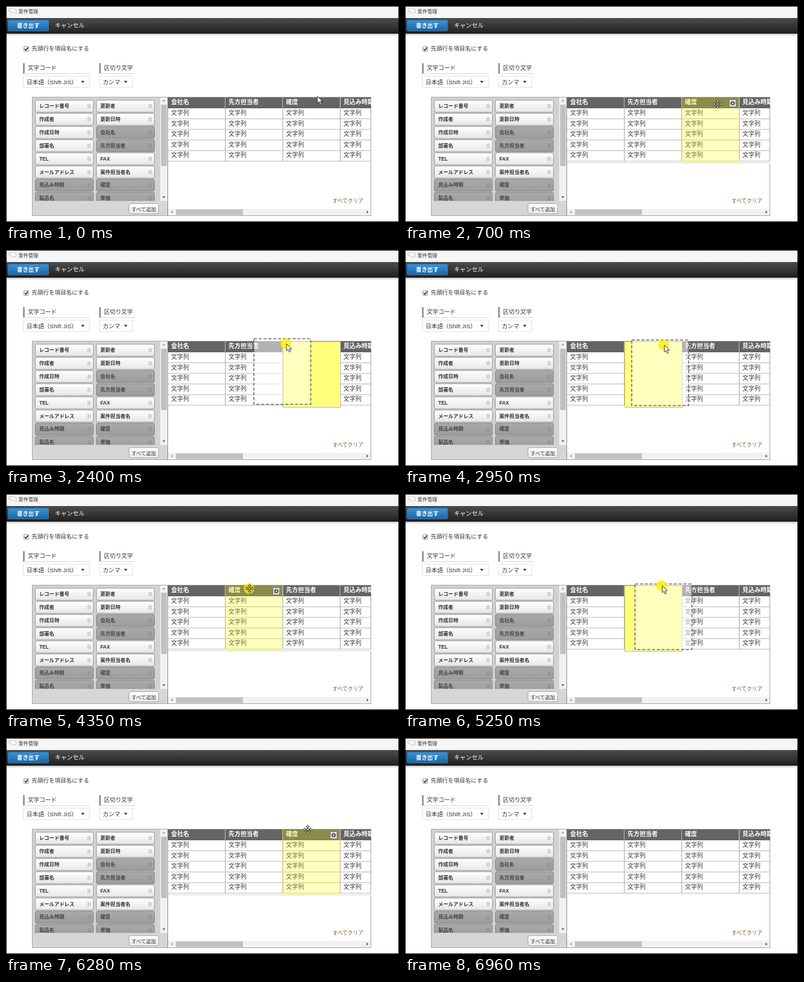
Recreate the animation shown at these times as an HTML page. Size 650 px wide and 359 px high, loop 7.03 s.

```html
<!DOCTYPE html>
<html lang="ja">
<head>
<meta charset="utf-8">
<title>案件管理</title>
<style>
html, body { margin: 0; width: 100%; height: 100%; overflow: hidden; background: #fff; }
svg { display: block; width: 650px; height: 359px; }
text { font-family: "Liberation Sans", "Noto Sans CJK JP", "Noto Sans CJK", sans-serif; white-space: pre; }
</style>
</head>
<body>
<svg id="stage" viewBox="0 0 650 359">
  <defs>
    <linearGradient id="bar" x2="0" y2="1"><stop stop-color="#4c4c4c"/><stop offset="1" stop-color="#1f1f1f"/></linearGradient>
    <linearGradient id="blue" x2="0" y2="1"><stop stop-color="#3d92d0"/><stop offset="1" stop-color="#1667ae"/></linearGradient>
    <linearGradient id="free" x2="0" y2="1"><stop stop-color="#fff"/><stop offset="1" stop-color="#e6e6e6"/></linearGradient>
    <linearGradient id="used" x2="0" y2="1"><stop stop-color="#a9a9a9"/><stop offset="1" stop-color="#9c9c9c"/></linearGradient>
    <linearGradient id="shade" x2="0" y2="1"><stop stop-color="#c4c4c4"/><stop offset="1" stop-color="#fff"/></linearGradient>
    <clipPath id="listClip"><rect x="43" y="152" width="212" height="172"/></clipPath>
    <clipPath id="tableClip"><rect x="268" y="140" width="336" height="197"/></clipPath>
  </defs>
  <g id="page"></g>
  <g id="table" clip-path="url(#tableClip)"></g>
  <g id="pointer"></g>
</svg>
<script>
const $ = id => document.getElementById(id);
const rect = (x, y, w, h, fill, more = '') =>
  `<rect x="${x}" y="${y}" width="${w}" height="${h}" fill="${fill}" ${more}/>`;
const text = (x, y, s, size, fill = '#333', more = '') =>
  `<text x="${x}" y="${y}" font-size="${size}" fill="${fill}" ${more}>${s}</text>`;
const path = (d, fill, more = '') => `<path d="${d}" fill="${fill}" ${more}/>`;
const bold = 'font-weight="bold"';

function item(name, n) {
  const x = 48 + n % 2 * 101, y = 156 + (n >> 1) * 21.9;
  const used = [5, 7, 12, 13, 14, 15].includes(n);
  return rect(x + .5, y + .5, 96, 20, used ? 'url(#used)' : 'url(#free)', `rx="2.5" stroke="${used ? '#868686' : '#999'}"`) +
    text(x + 7, y + 13, name, 8.3, used ? '#444' : '#333', bold) +
    path(`M${x + 87.5} ${y + 7}v7m2 -7v7m2 -7v7`, 'none', `stroke="${used ? '#888' : '#aaa'}" stroke-width=".8"`);
}

function select(x, w, label, value) {
  return rect(x, 95, 3, 17, '#999') + text(x + 8, 106, label, 9.6) +
    rect(x, 112, w + (w < 60 ? 3 : 0), 1, '#d5d5d5') +
    rect(x + .5, 116.5, w - 1, 19, '#fff', 'stroke="#e2e2e2"') +
    text(x + 6, 129.5, value, 9.6) +
    path(`M${x + w - 15} 124.5h6l-3 3.5z`, '#333');
}

const items = ['レコード番号', '更新者', '作成者', '更新日時', '作成日時', '会社名', '部署名', '先方担当者',
  'TEL', 'FAX', 'メールアドレス', '案件担当者名', '見込み時期', '確度', '製品名', '単価'];

$('page').innerHTML =
  rect(0, 0, 650, 359, '#fff') + rect(0, 0, 650, 20, '#f6f6f6') +
  path('M5 5h3l1.500 -1.500h3l1 2h3.500v5.500h-9v-2.500h-3z', '#fffaf0', 'stroke="#c9b9a0" stroke-width=".8"') +
  text(20.5, 12, '案件管理', 8.2) +
  rect(0, 20, 650, 26, 'url(#bar)') + rect(0, 46, 650, 4, 'url(#shade)') +
  rect(3.5, 23.5, 67, 18, 'url(#blue)', 'rx="2" stroke="#2d75b0"') +
  text(18, 36, '書き出す', 9.4, '#fff', bold) + text(81, 36, 'キャンセル', 9.8, '#fff') +
  rect(29.5, 67.5, 8, 8, '#f4f4f4', 'rx="1" stroke="#999"') +
  path('M31 71.500l2 2.200l3.500 -5', 'none', 'stroke="#333" stroke-width="1.700"') +
  text(42.5, 74, '先頭行を項目名にする', 9.5) +
  select(28, 111, '文字コード', '日本語（Shift JIS）') + select(154, 56, '区切り文字', 'カンマ') +
  // field list
  rect(43, 151, 225, 198, '#d2d2d5') +
  `<g clip-path="url(#listClip)">${items.map(item).join('')}</g>` +
  rect(255, 152, 12, 172, '#f1f1f1') + rect(256.5, 164, 9.5, 102, '#c1c1c1') +
  path('M258.500 158.500h5l-2.500 -3z', '#999') + path('M258.500 316.500h5l-2.500 3z', '#555') +
  rect(43, 324, 224, 25, '#d6d6d9') + rect(43.5, 151.5, 560, 197, 'none', 'stroke="#a6a6a6"') +
  rect(203.5, 328.5, 49, 17, 'url(#free)', 'rx="2.500" stroke="#aaa"') +
  text(207.5, 340.5, 'すべて追加', 8.3) +
  // table pane
  rect(268, 152, 335, 196, '#fff') + rect(267, 152, 1, 196, '#8a8a8a') +
  rect(268, 337, 335, 11, '#f1f1f1') + rect(281, 338, 111, 9.5, '#c1c1c1') +
  path('M275.500 340v5l-3 -2.500z', '#999') + path('M596.500 340v5l3 -2.500z', '#555') +
  text(540, 326.5, 'すべてクリア', 8.7, '#85522d') +
  rect(.5, .5, 649, 358, 'none', 'stroke="#111"');

const colX = [268, 363, 458, 553];
function column(name, slot) {
  const x = colX[slot];
  let s = rect(x, 152, 95, 18, '#646464') + text(x + 5, 163, name, 10, '#fff', bold);
  for (let r = 0; r < 5; r++) {
    s += rect(x, 187 + r * 17.6, 95, 1, '#b5b5b5') + text(x + 5, 181 + r * 17.6, '文字列', 10);
  }
  return s + rect(x + 94, 152, 1.5, 106, '#bdbdbd');
}

const gear = x => rect(x + 78.5, 155.5, 11, 12, '#eee', 'rx="1.500" stroke="#777"') +
  `<g fill="none" stroke="#444"><circle cx="${x + 84}" cy="161.500" r="2.200" stroke-width="1.600"/>` +
  `<circle cx="${x + 84}" cy="161.500" r="3.500" stroke-width="1.200" stroke-dasharray="1.370"/></g>`;

const arrow = 'M0 0v11.500l2.700 -2.400l2 4.500l2 -.9l-2 -4.300h3.700z';
const moveIcon = 'M0 -7.500l2.500 3h-1.700v3.700h3.700v-1.700l3 2.500l-3 2.500v-1.700h-3.700v3.700h1.700l-2.500 3l-2.500 -3h1.700v-3.700h-3.700v1.700l-3 -2.500l3 -2.500v1.700h3.700v-3.700h-1.700z';

// pointer track: step, x, y
const track = [[0, 515, 150], [2, 515, 150], [3, 515, 154], [5, 515, 155], [9, 517, 163], [24, 517, 163],
  [25, 512, 161], [31, 464, 156], [34, 447, 156], [38, 429, 158], [41, 424, 161], [54, 424, 161],
  [56, 403, 157], [65, 403, 157], [66, 405, 155], [70, 446, 150], [74, 490, 153], [77, 499, 152],
  [87, 499, 152], [88, 480, 217], [89, 460, 345], [90, 460, 345]];
function pointerAt(i) {
  const k = Math.max(1, track.findIndex(p => p[0] >= i));
  const [a, ax, ay] = track[k - 1], [b, bx, by] = track[k], u = (i - a) / (b - a);
  return [ax + (bx - ax) * u, ay + (by - ay) * u];
}

const between = (i, a, b) => i >= a && i < b;

function draw(i) {
  const [x, y] = pointerAt(i);
  const drag = between(i, 25, 45) || between(i, 66, 81);
  const press = between(i, 17, 45) || between(i, 56, 81);
  const hover = !drag && between(i, 3, 88);
  const slot = x < 458 ? 1 : 2, left = colX[slot];

  let s = column('会社名', 0) + column('先方担当者', 3 - slot) + column('見込み時期', 3);
  if (drag) {
    const [dx, dy] = i < 45 ? [54, 9] : [45, 3.5];
    s += rect(left + .5, 152.5, 95, 109, '#ffff7d', 'stroke="#777" stroke-dasharray="1"') +
      rect(x - dx, y - dy + .5, 94, 109, 'rgba(255,255,255,.5)', 'stroke="#6b6b5e" stroke-width="1.600" stroke-dasharray="5 3"');
  } else {
    s += column('確度', slot);
    if (hover) s += rect(268, 258, 336, 4, '#eee') + rect(left, 152, 95, 110, 'rgba(255,255,0,.25)') + gear(left);
  }
  $('table').innerHTML = s;

  let p = press ? `<circle cx="${x - 1}" cy="${y}" r="9" fill="#ffee00" fill-opacity=".8"/>` : '';
  if (i < 90) p += path(hover ? moveIcon : arrow, '#fff', `transform="translate(${x} ${y})" stroke="#222" stroke-width=".9"`);
  $('pointer').innerHTML = p;
}

const LOOP = 7030, STEPS = 91;
let last = -1;
function tick() {
  const t = performance.now() % LOOP;
  const i = Math.min(STEPS - 1, Math.floor(t / LOOP * STEPS + .12));
  if (i !== last) draw(last = i);
  requestAnimationFrame(tick);
}
tick();
</script>
</body>
</html>
```
